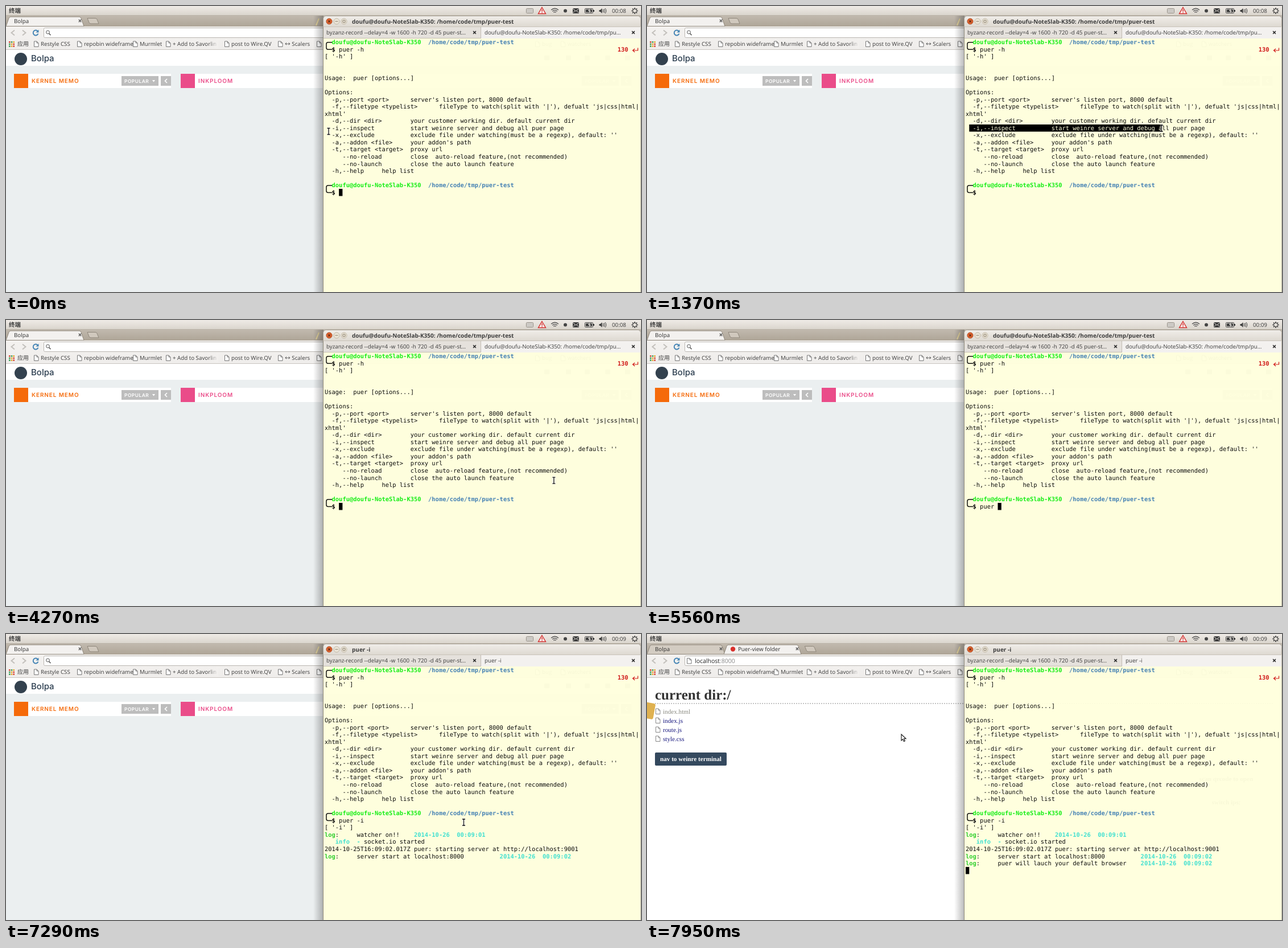
An HTML page with a canvas for the animation above (8 s loop, 1116 by 502 pixels).

```html
<!DOCTYPE html>
<html lang="en">
<head>
<meta charset="utf-8">
<title>Terminal demo</title>
<style>
html, body { margin: 0; width: 100%; height: 100%; overflow: hidden; }
canvas { display: block; }
</style>
</head>
<body>
<canvas id="stage" width="1116" height="502"></canvas>
<script>
const LOOP = 8000, W = 1116, H = 502;
const ctx = document.getElementById('stage').getContext('2d');
ctx.textRendering = 'geometricPrecision';

const SANS = '"Open Sans", "Noto Sans CJK SC", sans-serif';
const MONO = '"DejaVu Sans Mono", monospace';
const SERIF = '"Liberation Serif", serif';
const HEADING = 'Inter, sans-serif';

// Terminal grid
const X0 = 560, Y0 = 57.3, CELL_W = 6.278, CELL_H = 12.555, COLS = 88;
const GREEN = '#16ee16', BLUE = '#4682b4', CYAN = '#40e0d0', LOG = '#2fcf2f';
const HOST = 'doufu@doufu-NoteSlab-K350', CWD = '/home/code/tmp/puer-test';

const help = [
  "[ '-h' ]", '', '',
  'Usage:  puer [options...]', '',
  'Options:',
  "  -p,--port <port>      server's listen port, 8000 default",
  "  -f,--filetype <typelist>      fileType to watch(split with '|'), defualt 'js|css|html|",
  "xhtml'",
  '  -d,--dir <dir>        your customer working dir. default current dir',
  '  -i,--inspect          start weinre server and debug all puer page',
  "  -x,--exclude          exclude file under watching(must be a regexp), default: ''",
  "  -a,--addon <file>     your addon's path",
  '  -t,--target <target>  proxy url',
  '     --no-reload        close  auto-reload feature,(not recommended)',
  '     --no-launch        close the auto launch feature',
  '  -h,--help     help list'
];
const HELP_ROW = 2, INSPECT_ROW = 12, PROMPT_ROW = 21;

// Timeline in ms
const keys = [[4980, 'p'], [5080, 'u'], [5200, 'e'], [5330, 'r'], [5560, ' '], [5740, '-'], [6020, 'i']];
const ENTER = 6380, RETITLE = 6440, OUTPUT = 6880;
const BLANK = 7300, LOADED = 7640;
const HIDE = 4980, SHOW = 7000;
const pointerPath = [
  [60, 567, 220], [330, 568, 217], [530, 568, 217], [700, 610, 211], [820, 680, 206.5],
  [950, 750, 209], [1150, 845, 212], [1370, 904, 214.5], [1650, 965, 212], [2060, 996, 213],
  [4060, 996, 213], [4270, 963, 281], [4470, 938, 393], [7000, 938, 393],
  [7340, 782, 320], [7700, 600, 272], [7950, 447, 176]
];

function pointerAt(t) {
  let a = pointerPath[0];
  for (const b of pointerPath) {
    if (t < b[0]) {
      const k = Math.max(0, (t - a[0]) / (b[0] - a[0] || 1));
      return [a[1] + (b[1] - a[1]) * k, a[2] + (b[2] - a[2]) * k];
    }
    a = b;
  }
  return [a[1], a[2]];
}

function rect(x, y, w, h, fill) {
  ctx.fillStyle = fill;
  ctx.fillRect(x, y, w, h);
}

function box(x, y, w, h, radius, fill, stroke) {
  ctx.beginPath();
  ctx.roundRect(x, y, w, h, radius);
  if (fill) { ctx.fillStyle = fill; ctx.fill(); }
  if (stroke) { ctx.lineWidth = 1; ctx.strokeStyle = stroke; ctx.stroke(); }
}

function disc(x, y, r, fill, stroke) {
  box(x - r, y - r, 2 * r, 2 * r, r, fill, stroke);
}

function path(d, stroke, width = 1, fill) {
  const p = new Path2D(d);
  if (fill) { ctx.fillStyle = fill; ctx.fill(p); }
  if (stroke) { ctx.strokeStyle = stroke; ctx.lineWidth = width; ctx.stroke(p); }
}

function shade(x0, y0, x1, y1, from, to) {
  const g = ctx.createLinearGradient(x0, y0, x1, y1);
  g.addColorStop(0, from);
  g.addColorStop(1, to);
  return g;
}

// y is the middle of the capitals
function label(s, x, y, { size = 9.75, family = SANS, weight = 400, color = '#3b3b3b', spacing = 0, align = 'left' } = {}) {
  ctx.font = `${weight} ${size}px ${family}`;
  ctx.letterSpacing = spacing + 'px';
  ctx.textAlign = align;
  ctx.fillStyle = color;
  ctx.fillText(s, x, Math.round(y + size * 0.36));
  ctx.letterSpacing = '0px';
  ctx.textAlign = 'left';
}

function cross(x, y, r, color, width = 1.3) {
  path(`M${x - r} ${y - r}l${2 * r} ${2 * r}m0 ${-2 * r}l${-2 * r} ${2 * r}`, color, width);
}

function fileIcon(x, y, color = '#777') {
  path(`M${x + .5} ${y - 4.5}h4.5l3 3v6.5h-7.5zm4.5 0v3h3`, color, 1, '#fff');
}

function drawPanel(t) {
  rect(0, 0, W, 17, shade(0, 0, 0, 17, '#efebe6', '#d9d4cc'));
  rect(0, 16, W, 1, '#bab3a8');
  label('终端', 5, 8.5, { size: 10.5, weight: 700, family: '"Noto Sans CJK SC", sans-serif' });
  box(914.5, 4.5, 12, 8, 1, '#e8e4de', '#8c877f');
  for (let y = 6; y < 12; y += 2) for (let x = 916; x < 926; x += 2) rect(x, y, 1, 1, '#777');
  path('M942 2.5l6.5 11h-13z', '#d3302f', 1.4, '#f7ecea');
  rect(941.4, 6, 1.4, 4, '#d3302f');
  rect(941.4, 11, 1.4, 1.4, '#d3302f');
  path('M958 7q6.5-5.5 13 0M960.2 9.2q4.3-3.7 8.6 0M962.3 11.3q2.2-1.8 4.4 0', '#555', 1.3);
  disc(983, 8.5, 3, '#444');
  rect(996, 4, 11, 9, '#3c3c3c');
  path('M996 4.5l5.5 4.5 5.5-4.5M996 12.5l4-4m7 4l-4-4', '#e8e4df', 1);
  box(1017.5, 4.5, 14, 8, 1, null, '#3c3c3c');
  rect(1032, 7, 2, 3, '#3c3c3c');
  rect(1019, 6, 11, 5, '#3c3c3c');
  path('M1026 4l-3 5h2.5l-1 4 3.500-5h-2.500z', null, 1, '#efebe6');
  path('M1042.500 7h2l3-3v9l-3-3h-2z', null, 1, '#3c3c3c');
  path('M1049 6q1.500 2.500 0 5M1051 5q2.500 3.500 0 7M1053 4q3.500 4.500 0 9', '#3c3c3c', 1);
  label(t < 5500 ? '00:08' : '00:09', 1065, 8.5);
  disc(1105, 8.5, 3.4, null, '#3c3c3c');
  for (let i = 0; i < 8; i++) {
    const c = Math.cos(i * Math.PI / 4), s = Math.sin(i * Math.PI / 4);
    path(`M${1105 + 3.6 * c} ${8.5 + 3.6 * s}l${2 * c} ${2 * s}`, '#3c3c3c', 1.7);
  }
}

function browserTab(x, w, title, active, icon) {
  path(`M${x} 35.5l5-14q1-2.500 3-2.500H${x + w - 9}q2 0 3 2.500l5 14z`, '#8f877b', 1, active ? '#f3f1ef' : '#d3ccc2');
  if (w < 100) return;
  if (icon) disc(x + 16, 26.5, 4.2, icon);
  label(title, x + (icon ? 25 : 14), 26.5, { color: '#2f2f2f' });
  cross(x + w - 8, 26, 2.2, '#555');
}

function drawBookmarks() {
  for (let i = 0; i < 9; i++)
    rect(5 + i % 3 * 3.700, 62 + Math.floor(i / 3) * 3.700, 2.6, 2.6, ['#d9463b', '#3fa15b', '#e3a92f'][(i + (i > 2)) % 3]);
  label('应用', 20, 66.5, { size: 10, family: '"Noto Sans CJK SC", sans-serif' });
  const marks = [[49, 'Restyle CSS'], [125, 'repobin wideframe'], [223, 'Murmlet'],
    [281, '+ Add to Savorlin'], [384, 'post to Wire.QV'], [478, '↔ Scalers'], [546, ''], [930, 'bug'], [975, 'watchers']];
  for (const [x, name] of marks) {
    fileIcon(x, 66.5);
    label(name, x + 12, 66.5);
  }
  rect(355, 60, 18, 14, shade(355, 0, 373, 0, 'rgba(242,240,238,0)', '#f2f0ee'));
}

function drawDashboard() {
  rect(0, 77, W, H - 77, '#ebeff0');
  rect(0, 77, W, 28, '#fff');
  disc(26, 93, 11, '#33414e');
  label('Bolpa', 44, 92, { size: 15, family: HEADING, weight: 500, color: '#2c3e50' });
  for (const x of [950, 988, 1021, 1057, 1092]) rect(x - 4, 87, 9, 8, '#9aa4aa');
  const widget = (x, w, color, name) => {
    rect(x, 119, w, 25, '#fff');
    rect(x, 119, 25, 25, color);
    label(name, x + 31, 131.5, { size: 10, family: HEADING, weight: 600, color, spacing: 0.9 });
    const r = x + w;
    rect(r - 87, 123, 65, 17, '#bdbdbd');
    label('POPULAR', r - 82, 131.5, { size: 8.4, family: HEADING, weight: 600, color: '#fff', spacing: 0.5 });
    path(`M${r - 33} 130h5l-2.500 3.500z`, null, 1, '#fff');
    rect(r - 18, 123, 18, 17, '#bdbdbd');
    path(`M${r - 7} 128l-3.500 3.500 3.500 3.500`, '#fff', 1.6);
  };
  widget(14, 276, '#f56a0a', 'KERNEL MEMO');
  widget(307, 792, '#ea4c89', 'INKPLOOM');
}

function drawListing() {
  label('current dir:/', 14, 105.5, { size: 25, family: SERIF, weight: 700, color: '#333' });
  for (let x = 14; x < W - 14; x += 4) rect(x, 121, 2, 2, '#c4c4c4');
  ['index.html', 'index.js', 'route.js', 'style.css'].forEach((name, i) => {
    const y = 135.5 + i * 16;
    fileIcon(15, y, '#888');
    label(name, 28, y, { size: 11.16, family: SERIF, color: i ? '#17177e' : '#8a8a80' });
  });
  box(14, 208, 126, 23, 2, '#34495e');
  label('nav to weinre terminal', 23, 219, { size: 11.16, family: SERIF, weight: 700, color: '#fff' });
  const faint = { size: 11.16, family: SERIF, weight: 700, color: '#666', align: 'center' };
  label('scan qrcode to open', 1018, 254, faint);
  label('switch ips:', 1018, 295, faint);
}

function drawBrowser(t) {
  const navigated = t >= BLANK;
  rect(0, 17, W, 19, shade(0, 17, 0, 36, '#c1b9ae', '#aea597'));
  const grow = 137 * Math.min(1, Math.max(0, (t - 7340) / 200));
  const plus = 143 + grow * 0.98;
  path(`M${plus} 21.500h14q2 0 3 2l3 7.500h-14q-2 0-3-2z`, '#8f877b', 1, '#d0c8bd');
  browserTab(0, 138, 'Bolpa', !navigated);
  if (grow > 12) browserTab(135, grow, t < LOADED ? 'localhost:8000' : 'Puer-view folder', true, t < LOADED ? '#9a9a9a' : '#d9302c');
  path('M545 34l5-12', '#e2d29a', 2);

  rect(0, 36, W, 41, shade(0, 36, 0, 77, '#f4f2f0', '#efedeb'));
  rect(0, 76, W, 1, '#c9c5c0');
  path('M15 42.500l-5.500 4.500 5.500 4.500M29 42.500l5.500 4.500-5.500 4.500', '#c3c0bc', 2);
  if (navigated && t < LOADED) {
    disc(52, 47, 6, '#cf3a22', '#a92a18');
    cross(52, 47, 2.2, '#fff', 1.6);
  } else {
    path('M56 44.500a4.500 4.500 0 1 0 .500 4', '#4685b5', 2);
    path('M57.500 41.500v5h-5z', null, 1, '#4685b5');
  }
  box(66.5, 38.5, 1020, 17, 2, '#fff', '#b9b5b0');
  if (navigated) {
    fileIcon(70, 47);
    label('localhost', 84, 47, { size: 10.5, color: '#222' });
    label(':8000', 128, 47, { size: 10.5, color: '#888' });
  } else {
    disc(73.5, 46, 2.900, null, '#555');
    path('M75.500 48.300l3 3', '#555', 1.6);
  }
  drawBookmarks();
  if (navigated) rect(0, 77, W, H - 77, '#fff');
  else drawDashboard();
  if (t >= LOADED) drawListing();

  // Launcher icon peeking in from the screen edge
  if (t > 7330) {
    ctx.save();
    ctx.translate(-16 + 16 * Math.min(1, (t - 7330) / 600), 134);
    ctx.rotate(0.18);
    box(-13, -14, 26, 28, 3, '#dfb150');
    ctx.restore();
  }
}

function put(row, col, s, color = '#0a0a0a', bold = false) {
  ctx.font = `${bold ? 700 : 400} 10.43px ${MONO}`;
  ctx.fillStyle = color;
  [...s].forEach((ch, i) => {
    if (ch !== ' ') ctx.fillText(ch, X0 + (col + i) * CELL_W, Y0 + row * CELL_H + 9.8);
  });
}

function fillCells(row, from, to) {
  rect(X0 + from * CELL_W, Y0 + row * CELL_H, (to - from) * CELL_W, CELL_H, '#000');
}

function prompt(row, command) {
  const y = Y0 + row * CELL_H;
  put(row, 2, HOST, GREEN, true);
  put(row, 29, CWD, BLUE, true);
  path(`M573 ${y + 6.5}h-7q-3 0-3 3v6.500q0 3 3 3h7`, '#111', 1.5);
  put(row + 1, 2, '$', '#0a0a0a', true);
  put(row + 1, 4, command);
}

function selection(t) {
  if (t >= 530 && t < 2690) {
    const [x, y] = pointerAt(t), col = Math.round((x - X0) / CELL_W);
    if (y < 208) return [[INSPECT_ROW - 1, col, COLS], [INSPECT_ROW, 0, 1]];
    return [[INSPECT_ROW, 1, col > 67 ? COLS : col]];
  }
  if (t >= 2930 && t < 3280) return [[INSPECT_ROW, 67, COLS]];
  if (t >= 3280 && t < 3920) return [[INSPECT_ROW, 0, COLS]];
  return [];
}

function logLine(row, text, dateCol, time) {
  put(row, 0, 'log', LOG, true);
  put(row, 3, ':', '#0a0a0a');
  put(row, 9, text);
  put(row, dateCol, '2014-10-26  ' + time, CYAN, true);
}

function caret(t, typed) {
  const off = start => Math.floor((t - start) / 581) % 2 === 0;
  if (t < HIDE) return Math.floor((t - 4812 + 578 * 10) / 578) % 2 ? [PROMPT_ROW, 4] : null;
  if (t < ENTER) return [PROMPT_ROW, 4 + typed.length];
  if (t < OUTPUT) return [22, 0];
  if (t >= 7150 && off(7150)) return null;
  return [t < 7050 ? 24 : t < 7250 ? 25 : t < 7450 ? 27 : 28, 0];
}

function drawTerminal(t) {
  const title = t < RETITLE ? `${HOST}: ${CWD}` : 'puer -i';
  rect(540, 17, 18, H - 17, shade(540, 0, 558, 0, 'rgba(0,0,0,0)', 'rgba(0,0,0,.28)'));

  box(557.5, 17.5, 558, 22, [5, 5, 0, 0], shade(0, 17, 0, 37, '#f1eeea', '#ddd8d0'), '#a9a296');
  disc(568, 27, 5, '#e0632f', '#a9481f');
  cross(568, 27, 1.900, '#5d2a12');
  for (const x of [581, 594]) disc(x, 27, 5, '#ece6d9', '#c0b7a5');
  path('M578.500 27h5', '#857b68', 1);
  path('M592 25h4v4h-4z', '#857b68', 1);
  label(title, 608, 27, { size: 10, weight: 700, color: '#3c3c3c' });

  rect(558, 37, 558, 20, '#f3f1ef');
  rect(558, 37, 276, 19, '#e5e1dc');
  rect(834, 37, 1, 20, '#c2bcb3');
  rect(558, 36, 558, 1, '#c9c3ba');
  rect(558, 56, 276, 1, '#c2bcb3');
  label('byzanz-record --delay=4 -w 1600 -h 720 -d 45 puer-st…', 563, 46.5);
  label(t < RETITLE ? `${HOST}: /home/code/tmp/pu…` : title, 841, 46.5);
  cross(823.5, 46.5, 2.4, '#333', 1.5);
  cross(1102.5, 46.5, 2.4, '#333', 1.5);

  rect(558, 57, 557, H - 57, 'rgba(255,255,221,.955)');
  rect(557, 37, 1, H - 37, '#8f8a7c');
  rect(1115, 37, 1, H - 37, '#b9b4a4');

  const typed = keys.filter(([at]) => t >= at).map(([, ch]) => ch).join('');
  prompt(0, 'puer -h');
  put(1, 82, '130', '#d01818', true);
  path('M1110.500 73.500v4.500h-9m3.500-3l-3.500 3 3.500 3', '#d01818', 1.2);
  help.forEach((line, i) => put(HELP_ROW + i, 0, line));
  prompt(PROMPT_ROW - 1, typed);

  for (const [row, from, to] of selection(t)) {
    fillCells(row, from, to);
    put(row, from, help[row - HELP_ROW].slice(from, to), '#ffffdd');
  }
  if (t >= OUTPUT) {
    put(22, 0, "[ '-i' ]");
    logLine(23, 'watcher on!!', 25, '00:09:01');
  }
  if (t >= 7050) {
    put(24, 3, 'info  -', CYAN, true);
    put(24, 11, 'socket.io started');
  }
  if (t >= 7250) {
    put(25, 0, '2014-10-25T16:09:02.017Z puer: starting server at http://localhost:9001');
    logLine(26, 'server start at localhost:8000', 49, '00:09:02');
  }
  if (t >= 7450) logLine(27, 'puer will lauch your default browser', 49, '00:09:02');

  const cell = caret(t, typed);
  if (cell) fillCells(cell[0], cell[1], cell[1] + 1);
}

function drawPointer(t) {
  if (t >= HIDE && t < SHOW) return;
  const [x, y] = pointerAt(t);
  if (x > 558) {
    const beam = `M${x - 2.500} ${y - 5.500}h5m-2.500 0v11m-2.500 0h5`;
    path(beam, 'rgba(255,255,255,.8)', 3);
    path(beam, '#111', 1.3);
  } else {
    path(`M${x} ${y}v11l2.600-2.400 1.800 4 2-.900-1.800-3.900h3.500z`, '#111', 1.1, '#fff');
  }
}

function frame() {
  const t = performance.now() % LOOP;
  drawBrowser(t);
  drawPanel(t);
  drawTerminal(t);
  drawPointer(t);
  requestAnimationFrame(frame);
}
frame();
</script>
</body>
</html>
```
